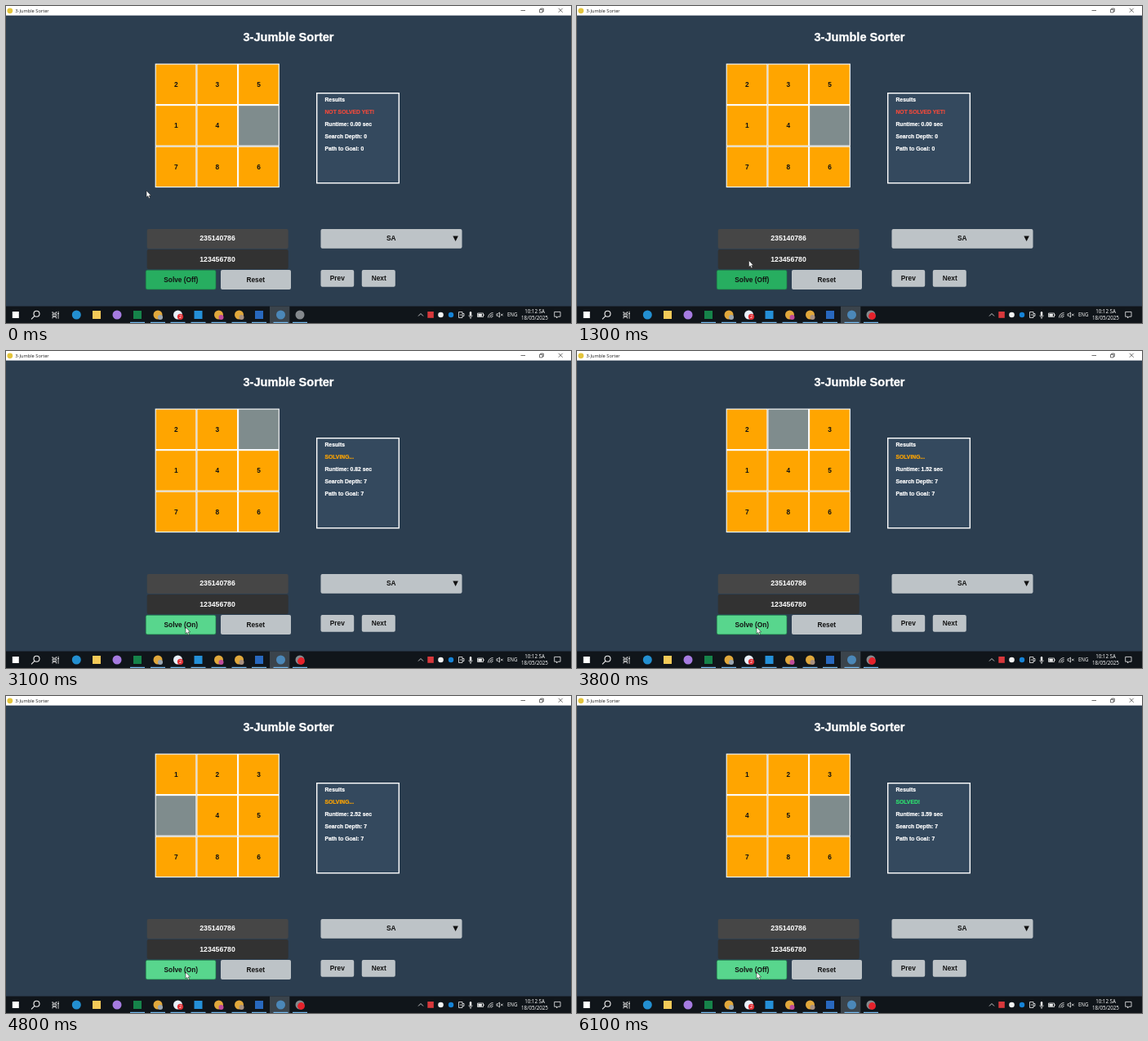
Write an HTML page that moves like this. It is 692 px wide and 388 px high and loops after 7100 ms.

```html
<!DOCTYPE html>
<html lang="en">
<head>
<meta charset="utf-8">
<title>3-Jumble Sorter</title>
<style>
  html, body { margin: 0; width: 100%; height: 100%; overflow: hidden; background: #2c3e50; }
  svg { display: block; width: 100%; height: 100%; }
  text { font-family: "Liberation Sans", Arial, sans-serif; font-weight: 700; }
  .mid { text-anchor: middle; }
  .label { font-size: 8.3px; fill: #111; }
  .entry { font-size: 8.7px; fill: #fff; }
  .heading { font-size: 14.6px; fill: #fff; stroke: #fff; stroke-width: .3px; }
  .result { font-size: 6.75px; fill: #fff; stroke: currentColor; stroke-width: .22px; color: #fff; }
  #status { fill: currentColor; }
  .system { font-family: "Open Sans", "Noto Sans", sans-serif; font-weight: 400; }
  .tray { font-size: 6.2px; fill: #fff; }
  .line { fill: none; stroke: #f2f2f2; stroke-width: .8; }
  .button { fill: #bdc3c7; }
</style>
</head>
<body>
<svg viewBox="0 0 692 388" preserveAspectRatio="none">
  <rect width="692" height="388" fill="#2c3e50"/>

  <!-- Window bar -->
  <rect width="692" height="11.6" fill="#fff"/>
  <circle cx="4.8" cy="5.8" r="3.4" fill="#e3c43c"/>
  <text class="system" x="11.3" y="8" font-size="5.7" fill="#222">3-Jumble Sorter</text>
  <path d="M630.5 5.5h5.5M653.5 4.3h3.6v3.6h-3.6zM654.7 4.3V3.1h3.6v3.6h-1.2M676.7 2.8l5 5M681.7 2.8l-5 5"
        fill="none" stroke="#333" stroke-width=".7"/>

  <text class="heading mid" x="346" y="43">3-Jumble Sorter</text>
  <g id="board"></g>

  <!-- Results -->
  <rect x="380.7" y="106.7" width="100.6" height="110" fill="#34495e" stroke="#fff" stroke-width="1.4"/>
  <text class="result" x="390.5" y="117">Results</text>
  <text class="result" x="390.5" y="132" id="status"></text>
  <text class="result" x="390.5" y="147" id="runtime"></text>
  <text class="result" x="390.5" y="162" id="depth"></text>
  <text class="result" x="390.5" y="177" id="goal"></text>

  <!-- Controls -->
  <rect x="172.7" y="273" width="173" height="24" rx="2" fill="#464646"/>
  <rect x="172.7" y="298" width="173" height="24" rx="2" fill="#323232"/>
  <text class="entry mid" x="259" y="287.4">235140786</text>
  <text class="entry mid" x="259" y="312.6">123456780</text>
  <rect id="solve" x="171.2" y="323.3" width="85.8" height="23.6" rx="2" stroke="#1d7a45" stroke-width=".7"/>
  <text id="solveText" class="label mid" x="214.3" y="337.6"></text>
  <rect class="button" x="263" y="323" width="86" height="24" rx="2"/>
  <text class="label mid" x="305.8" y="337.6">Reset</text>
  <rect class="button" x="385.5" y="273" width="173" height="23.8" rx="2"/>
  <text class="label mid" x="471.7" y="287.4">SA</text>
  <path d="M547.3 281.6h6.6l-3.3 6.4z" fill="#111"/>
  <rect class="button" x="385.5" y="323" width="40.7" height="20.7" rx="2"/>
  <text class="label mid" x="405.8" y="336.2">Prev</text>
  <rect class="button" x="435.8" y="323" width="41" height="20.7" rx="2"/>
  <text class="label mid" x="456.7" y="336.2">Next</text>

  <!-- Taskbar -->
  <rect y="367.5" width="692" height="20.5" fill="#10151a"/>
  <rect x="323" y="367.5" width="24.3" height="20.5" fill="#3b444c"/>
  <rect x="7.8" y="374" width="8" height="8" fill="#fff"/>
  <g class="line">
    <g stroke-width="1.1"><circle cx="37.5" cy="376.8" r="3.5"/><path d="M35 379.4l-4 4"/></g>
    <path d="M57 374v2h4.5v-2M57 382.5v-2h4.5v2M57 377.2h4.5v2H57zM64 373.8v9M63 376.5h2"/>
  </g>
  <g id="apps"></g>
  <circle cx="213.5" cy="380.3" r="3.6" fill="#e02f35"/>
  <text class="system mid" x="213.5" y="382.3" font-size="5.5" fill="#fff">2</text>
  <circle id="recording" cx="361.5" cy="379.5" r="4.4" fill="#e5222b"/>

  <rect x="516.3" y="374" width="7.5" height="7.8" fill="#d8383c"/>
  <circle cx="532.5" cy="378" r="3.3" fill="#f2f2f2"/>
  <circle cx="545" cy="378" r="3.2" fill="#1684d8"/>
  <g class="line">
    <path d="M505 379.5l3-3 3 3"/>
    <path d="M554.5 374.5h4.5v7h-4.5zM559 376.5h2v3h-2M556 378h2"/>
    <path d="M567 378.5c0 3.2 4 3.2 4 0M569 381v2"/>
    <path d="M577.5 376h7v4.5h-7zM585.3 377.5v1.5"/>
    <path d="M590.5 381.5a6 6 0 0 1 6-6M592.6 381.5a4 4 0 0 1 4-4M594.6 381.5a2 2 0 0 1 2-2"/>
    <path d="M601 376.8h1.4l2-1.8v6l-2-1.8H601zM606 376.7l2.6 2.6M608.6 376.7l-2.6 2.6"/>
    <path d="M671.7 374.4h7.3v5.8h-3l-1.5 1.8v-1.8h-2.8z"/>
  </g>
  <rect x="567.8" y="374" width="2.4" height="5.6" rx="1.2" fill="#f2f2f2"/>
  <rect x="578.3" y="376.8" width="4.6" height="3" fill="#f2f2f2"/>
  <text class="system tray mid" x="620.2" y="380.3">ENG</text>
  <text class="system tray mid" x="647.5" y="375.8">10:12 SA</text>
  <text class="system tray mid" x="647.5" y="384.4" font-size="5.9">18/05/2025</text>

  <path id="pointer" d="M0 0v8l1.8-1.6 1.3 3 1.4-.6-1.3-2.9h2.4z" fill="#fff" stroke="#111" stroke-width=".5"/>
</svg>

<script>
const LOOP = 7100, FRAME = 100;
const HOVER = 1500, CLICK = 2200, CLOCK_START = 2280, MOVE = 513, SOLVED = 3590;
const BLANK_PATH = [5, 2, 1, 0, 3, 4, 5, 8];
const $ = id => document.getElementById(id);

function add(parent, tag, attributes) {
  const node = document.createElementNS("http://www.w3.org/2000/svg", tag);
  for (const key in attributes) node.setAttribute(key, attributes[key]);
  return parent.appendChild(node);
}

// Boards after each slide of the blank cell.
const boards = [[..."23514 786"]];
for (let i = 1; i < BLANK_PATH.length; i++) {
  const next = [...boards[i - 1]];
  const from = BLANK_PATH[i - 1], to = BLANK_PATH[i];
  [next[from], next[to]] = [next[to], next[from]];
  boards.push(next);
}

const cells = boards[0].map((_, i) => {
  const x = 182.7 + (i % 3) * 50.7, y = 70.6 + Math.floor(i / 3) * 50.5;
  const box = add($("board"), "rect", {
    x: x + .5, y: y + .5, width: 49.7, height: 49.5, stroke: "#fff", "stroke-width": 1.1
  });
  const digit = add($("board"), "text", { class: "label mid", x: x + 25.5, y: y + 28.2 });
  return { box, digit };
});

function app(x, color, { square, running, avatar } = {}) {
  const shape = square ? { x: x - 5, y: 373, width: 10, height: 10 } : { cx: x, cy: 378, r: 5.5 };
  add($("apps"), square ? "rect" : "circle", { ...shape, fill: color });
  if (avatar) add($("apps"), "circle", { cx: x + 3, cy: 381, r: 3, fill: avatar });
  if (running) add($("apps"), "rect", { x: x - 9, y: 386.8, width: 18, height: 1.2, fill: "#76b9ed" });
}
const running = true, square = true;
app(86.3, "#238fd0");
app(111, "#f4ca58", { square });
app(136, "#a67be0");
app(161, "#16834a", { square, running });
app(186, "#e0a83c", { running, avatar: "#9aa6b2" });
app(210.5, "#e8f0fa", { running });
app(235.5, "#2490d8", { square, running });
app(260.5, "#e0a83c", { running, avatar: "#c04b9b" });
app(285.5, "#e0a83c", { running, avatar: "#a89080" });
app(310, "#2868be", { square, running });
app(336.5, "#4b87b8", { running });
app(360, "#85898d", { running });

function pointerAt(t) {
  const turn = 1300, end = 1700;
  const a = Math.min(t / turn, 1);
  const b = Math.max(0, Math.min((t - turn) / (end - turn), 1));
  return [172 + 38.5 * a + 9.5 * b, 226 + 85.5 * a + 26.5 * b];
}

function draw(t) {
  const elapsed = Math.max(0, Math.min(t - CLOCK_START, SOLVED));
  const started = t >= CLICK, solved = elapsed === SOLVED;
  const board = boards[Math.min(7, Math.floor(elapsed / MOVE))];
  cells.forEach(({ box, digit }, i) => {
    box.setAttribute("fill", board[i] === " " ? "#7f8c8d" : "#ffa500");
    digit.textContent = board[i];
  });

  const [message, color] = solved ? ["SOLVED!", "#2ee06f"]
    : started ? ["SOLVING...", "#ffa500"] : ["NOT SOLVED YET!", "#f04a3c"];
  $("status").textContent = message;
  $("status").style.color = color;
  $("runtime").textContent = `Runtime: ${(elapsed / 1000).toFixed(2)} sec`;
  $("depth").textContent = `Search Depth: ${started ? 7 : 0}`;
  $("goal").textContent = `Path to Goal: ${started ? 7 : 0}`;

  $("solve").setAttribute("fill", t >= HOVER ? "#58d68d" : "#27ae60");
  $("solveText").textContent = started && !solved ? "Solve (On)" : "Solve (Off)";
  $("recording").setAttribute("visibility", t >= 300 ? "visible" : "hidden");
  $("pointer").setAttribute("transform", `translate(${pointerAt(t)})`);
}

const origin = performance.now();
function tick() {
  const t = (performance.now() - origin) % LOOP;
  draw(Math.floor(t / FRAME) * FRAME);
  requestAnimationFrame(tick);
}
tick();
</script>
</body>
</html>
```
